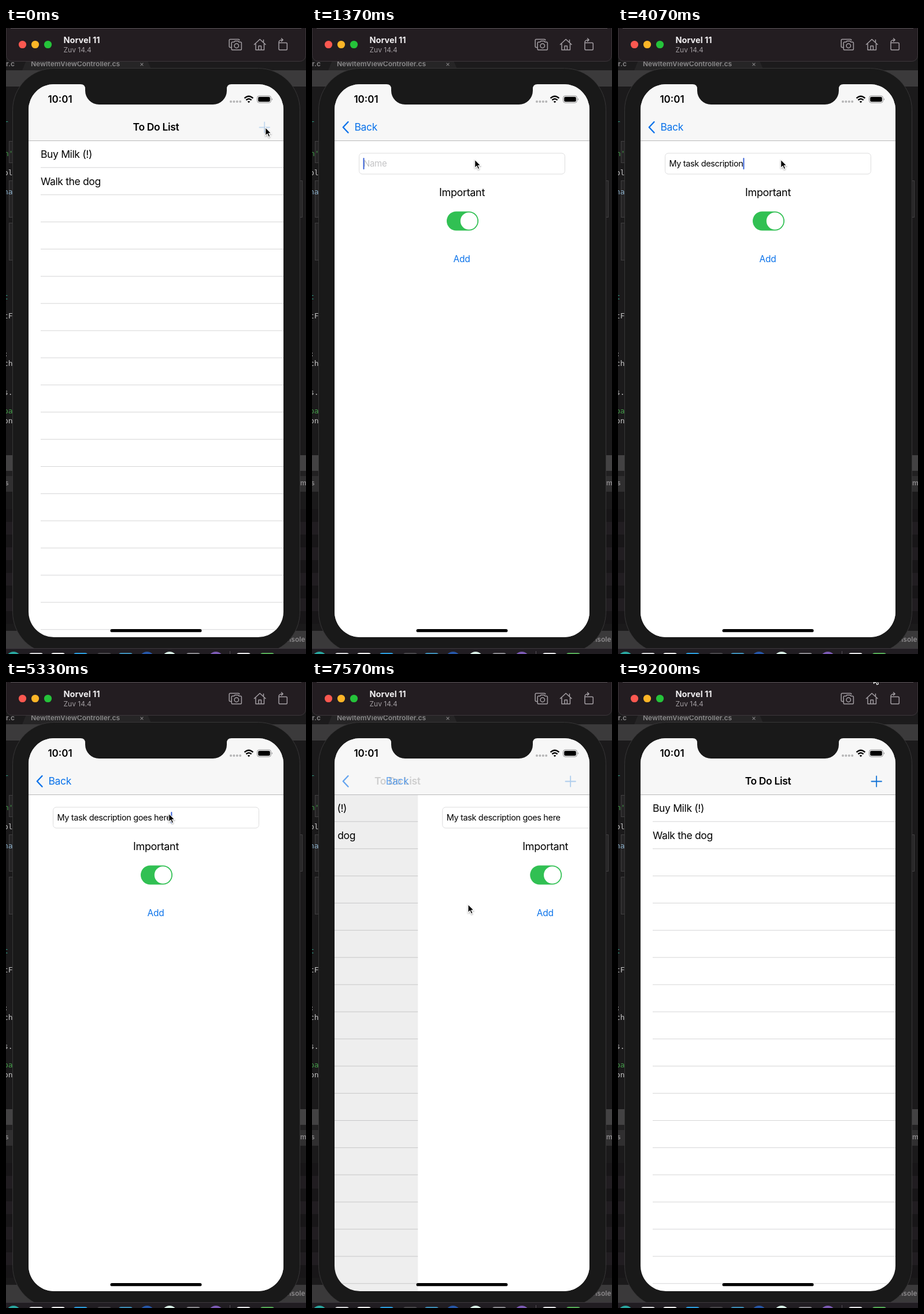
Recreate the animation shown at these times as an HTML page. Size 519 by 1080 pixels, loop 9230 ms.

```html
<!DOCTYPE html>
<html lang="en">
<head>
<meta charset="utf-8">
<title>To do list</title>
<style>
html, body { margin: 0; width: 100%; height: 100%; overflow: hidden; background: #1b1a1b; }
svg { display: block; width: 100vw; height: 100vh; font-family: Inter, "Liberation Sans", sans-serif; }
text { white-space: pre; }
.body { font-size: 17.5px; letter-spacing: -.02em; }
.field { font-size: 14.5px; letter-spacing: -.025em; }
.blue { fill: #0a72ea; }
.mid { text-anchor: middle; }
.bold { font-weight: 600; }
.code { font: 13px "DejaVu Sans Mono", "Liberation Mono", monospace; fill: #c4c4c4; }
.panel { font-size: 12px; font-weight: 600; fill: #8b898b; }
.icon { fill: none; stroke: #a29da2; stroke-width: 1.5; stroke-linejoin: round; stroke-linecap: round; }
</style>
</head>
<body>
<svg viewBox="0 0 519 1080">
  <defs>
    <clipPath id="screen"><rect x="39" y="97" width="441" height="954" rx="44"/></clipPath>
    <filter id="soft" x="-50%" y="-50%" width="200%" height="200%">
      <feDropShadow dx="0" dy="1.2" stdDeviation="1.2" flood-opacity=".4"/>
    </filter>
  </defs>

  <!-- editor behind the phone -->
  <rect width="519" height="1080" fill="#1b1a1b"/>
  <rect y="50" width="519" height="23" fill="#1c1b1c"/>
  <path d="M28 73L36 54H244L252 73Z" fill="#262526"/>
  <rect y="73" width="519" height="28" fill="#3b3a3b"/>
  <g class="panel" fill="#777">
    <text x="-7" y="66">er.c</text>
    <text x="43" y="66">NewItemViewController.cs</text>
    <text x="231" y="66" font-weight="400">×</text>
  </g>
  <g fill="#252425" stroke="#414041">
    <rect x="5.5" y="195.5" width="60" height="37"/>
    <rect x="5.5" y="263.5" width="507" height="63"/>
    <rect x="5.5" y="336.5" width="60" height="64"/>
  </g>
  <g id="code" class="code"></g>
  <rect y="737" width="519" height="27" fill="#434243"/>
  <rect y="764" width="519" height="9" fill="#222122"/>
  <rect y="773" width="519" height="27" fill="#302f30"/>
  <g id="rows"></g>
  <rect y="1040" width="519" height="30" fill="#3a393a"/>
  <g class="panel">
    <text x="-2" y="789">s</text>
    <text x="509" y="789">me</text>
    <text x="486" y="1059">nsole</text>
  </g>

  <!-- phone body -->
  <rect x="11.5" y="69.5" width="497" height="1010" rx="72" fill="#191919" stroke="#373637"/>

  <g clip-path="url(#screen)">
    <rect x="39" y="97" width="441" height="954" fill="#fff"/>
    <g id="list">
      <path id="lines" stroke="#d5d5d6"/>
      <text class="body" x="60" y="224">Buy Milk (!)</text>
      <text class="body" x="60" y="271">Walk the dog</text>
    </g>
    <rect id="dim" x="39" y="195" width="441" height="856"/>
    <g id="form">
      <rect x="39" y="195" width="441" height="856" fill="#fff"/>
      <rect x="81.5" y="216" width="356" height="36" rx="5.5" fill="#fff" stroke="#dcdcdd"/>
      <text id="hint" x="89" y="239" font-size="15" letter-spacing="-.3" fill="#c3c3c5">Name</text>
      <text id="entry" class="field" x="88.5" y="239"></text>
      <rect id="caret" y="224" width="2" height="20" rx="1" fill="#3a62d8"/>
      <text class="body mid" x="259.5" y="290" style="font-size:18px">Important</text>
      <rect x="233" y="316.5" width="55" height="33" rx="16.5" fill="#31c053"/>
      <circle cx="271.5" cy="333" r="14.7" fill="#fff"/>
      <text id="add" class="blue mid" x="259" y="403.5" font-size="15.5" letter-spacing="-.2">Add</text>
    </g>

    <rect x="39" y="97" width="441" height="98" fill="#f7f7f7"/>
    <path d="M39 194.5H480" stroke="#b9b9ba"/>
    <text id="title" class="body bold mid" x="259.5" y="177">To Do List</text>
    <path id="chevron" d="M62.5 162L53.8 171.2L62.5 180.5" fill="none" stroke="#0a72ea" stroke-width="2.4" stroke-linecap="round" stroke-linejoin="round"/>
    <text id="back" class="body blue" x="73.5" y="177">Back</text>
    <path id="plus" d="M438.5 171.5H456M447.2 162.5V180.5" stroke="#0f71d6" stroke-width="1.8" stroke-linecap="round"/>

    <text class="bold mid" x="93.5" y="129" font-size="17">10:01</text>
    <g fill="#b5b5b6">
      <circle cx="389" cy="127" r="2"/><circle cx="394.4" cy="127" r="2"/>
      <circle cx="399.8" cy="127" r="2"/><circle cx="405.2" cy="127" r="2"/>
    </g>
    <g fill="none" stroke="#000" stroke-width="2.5">
      <path d="M412.6 121.2Q420 114.2 427.4 121.2M415.4 124.4Q420 120 424.6 124.4"/>
      <path d="M420 129.2L417.7 126.9Q420 124.9 422.3 126.9Z" fill="#000" stroke="none"/>
    </g>
    <rect x="434.5" y="117" width="24" height="12" rx="3.6" fill="none" stroke="#8e8e8f"/>
    <rect x="436.2" y="118.7" width="20.6" height="8.6" rx="2.2"/>
    <path d="M460 121Q462.2 123 460 125Z" fill="#8e8e8f"/>
    <rect x="180.5" y="1037" width="158" height="5.3" rx="2.65"/>
    <path d="M129 96V97q8 0 8 8v3a24 24 0 0 0 24 24h197a24 24 0 0 0 24-24v-3q0-8 8-8V96Z" fill="#191919"/>
  </g>

  <!-- window bar -->
  <rect x=".5" y="-12" width="518" height="69.5" rx="10" fill="#231d21" stroke="#3c363a"/>
  <path d="M8 .5H511" stroke="#5a5458"/>
  <circle cx="28.5" cy="28.5" r="6.6" fill="#fb5850"/>
  <circle cx="50.5" cy="28.5" r="6.6" fill="#fcb527"/>
  <circle cx="72.5" cy="28.5" r="6.6" fill="#25c33a"/>
  <text x="99.5" y="26" font-size="14.5" font-weight="700" fill="#f1eff1">Norvel 11</text>
  <text x="99.5" y="42" font-size="12" fill="#a19ca0">Zuv 14.4</text>
  <g class="icon">
    <path d="M389.5 33.5H388Q386.2 33.5 386.2 31.5V21.2Q386.2 19.4 388 19.4H402Q403.8 19.4 403.8 21"/>
    <path d="M392 24.2H394.5L396 22.4H401.6L403.1 24.2H405.6Q407.4 24.2 407.4 26V36Q407.4 37.8 405.6 37.8H392Q390.2 37.8 390.2 36V26Q390.2 24.2 392 24.2Z"/>
    <circle cx="398.8" cy="30.7" r="3.7"/>
    <path d="M429.5 28.5L439.2 19.5L449 28.5M432 27V37.8H446.5V27M445.5 24.5V20.5M437 37.5V31H441.5V37.5"/>
    <path d="M472 25.5H484.5Q486.3 25.5 486.3 27.3V36Q486.3 37.8 484.5 37.8H474Q472 37.8 472 36ZM472 25.5Q471.5 20.5 479 20.5M476.5 18L479.2 20.5L476.5 23"/>
  </g>

  <!-- dock -->
  <rect y="1070" width="519" height="10" fill="#211d22"/>
  <path d="M0 1070.5H519" stroke="#3d383e"/>
  <path d="M387.5 1075V1080" stroke="#555057"/>
  <g id="dock"></g>

  <g id="cursor" filter="url(#soft)">
    <path d="M0 0V14.3L3.3 11.3L5.5 16.5L8 15.4L5.8 10.4H10.2Z" stroke="#fff" stroke-width="1.1"/>
  </g>
</svg>
<script>
const LOOP = 9230;
const PUSH = 0, POP = 7500;
const FOCUS = 1300, TYPED = 5200;
const MESSAGE = "My task description goes here";
const $ = id => document.getElementById(id);

function add(parent, tag, attrs, text = "") {
  const node = document.createElementNS("http://www.w3.org/2000/svg", tag);
  for (const key in attrs) node.setAttribute(key, attrs[key]);
  node.textContent = text;
  $(parent).append(node);
}

// Static details: separators, code margin, console rows, dock
let lines = "";
for (let i = 0; i < 18; i++) lines += `M60 ${(240.8 + i * 46.88).toFixed(1)}H480`;
$("lines").setAttribute("d", lines);

const TEAL = "#2fae94", GREEN = "#45a04a", PALE = "#c4c4c4";
[["r", -4, 168, TEAL], ["n'", -3, 221, GREEN], ["ol", -4, 254, PALE], ["na", -4, 287, "#8fb4cf"],
 ["t", -4, 468, TEAL], ["tF", -4, 501, PALE], [";", -4, 566, PALE], ["ch", -4, 583, PALE],
 ["s.", -4, 633, PALE], ["pa", -4, 665, GREEN], ["on", -4, 682, PALE]
].forEach(([s, x, y, fill]) => add("code", "text", { x, y, style: `fill:${fill}` }, s));

for (let i = 0; i < 9; i++)
  add("rows", "rect", { x: 0, y: 830 + i * 22, width: 519, height: 22, fill: i % 2 ? "#211d21" : "#181618" });

[[13, "#2aa7a0", 1], [52, "#d8d8da"], [90, "#f2f2f2"], [129, "#2d9fe0"], [170, "#4a484c"], [207, "#3f8fb8"],
 [244, "#2757a8", 1], [283, "#d9efe6", 1], [324, "#8c8b90"], [363, "#7d5bb5", 1], [411, "#e8e8ea"], [452, "#57ad58"]
].forEach(([x, fill, round]) => round
  ? add("dock", "circle", { cx: x, cy: 1089, r: 13, fill })
  : add("dock", "rect", { x: x - 12, y: 1078, width: 24, height: 24, rx: 4, fill }));

const clamp = v => Math.min(1, Math.max(0, v));

// Critically damped spring, 0 to 1
function spring(ms) {
  if (ms <= 0) return 0;
  const k = ms * 0.0165;
  return 1 - (1 + k) * Math.exp(-k);
}

const ease = {
  in: u => u * u,
  out: u => 1 - (1 - u) ** 2,
  both: u => u * u * (3 - 2 * u)
};

// time, x, y, easing towards this point
const path = [
  [60, 448.8, 171.5], [370, 430, 206.5, "in"], [1050, 281.7, 227, "out"],
  [5500, 281.7, 227, "both"], [6500, 268.3, 375.5, "both"], [6900, 270, 383.5, "both"],
  [8250, 270, 383.5, "both"], [9200, 442.5, -12, "both"]
];

function cursorAt(t) {
  const i = path.findIndex(p => t < p[0]);
  if (i === 0) return path[0].slice(1);
  if (i < 0) return path[path.length - 1].slice(1);
  const a = path[i - 1], b = path[i];
  const u = ease[b[3]]((t - a[0]) / (b[0] - a[0]));
  return [a[1] + (b[1] - a[1]) * u, a[2] + (b[2] - a[2]) * u];
}

// start, end, characters typed in that burst
const bursts = [[2450, 2780, 3], [2830, 4050, 16], [4250, TYPED, 10]];
const typed = t => bursts.reduce((n, [a, b, count]) => n + Math.floor(clamp((t - a) / (b - a)) * count), 0);

function caretShown(t) {
  if (t < FOCUS || t >= POP) return false;
  if (t >= bursts[0][0] && t < TYPED) return true;
  return (t - (t < TYPED ? FOCUS : TYPED)) % 1000 < 600;
}

const move = (id, x, y = 0) => $(id).setAttribute("transform", `translate(${x.toFixed(2)} ${y.toFixed(2)})`);
const fade = (id, v) => $(id).setAttribute("opacity", clamp(v).toFixed(3));

function render(t) {
  const p = t < POP ? spring(t - PUSH) : 1 - spring(t - POP);
  move("list", -132 * p);
  move("form", 441 * (1 - p));
  fade("dim", 0.1 * p);

  move("title", -166 * p);
  fade("title", 1 - p * 1.25);
  move("back", 166 * (1 - p));
  fade("back", p * 1.25 - 0.23);
  fade("chevron", p * 1.25 - 0.23);
  fade("plus", (t < POP ? 0.22 : 1.05) * (1 - p * 1.05));

  const entry = $("entry"), text = MESSAGE.slice(0, typed(t));
  if (entry.textContent !== text) entry.textContent = text;
  fade("hint", text ? 0 : 1);
  $("caret").setAttribute("x", 88.5 + (text ? entry.getComputedTextLength() : 0));
  fade("caret", caretShown(t) ? 1 : 0);
  fade("add", t > POP - 100 && t < POP ? 0.3 : 1);

  move("cursor", ...cursorAt(t));
}

const start = performance.now();
function frame() {
  render((performance.now() - start) % LOOP);
  requestAnimationFrame(frame);
}
frame();
</script>
</body>
</html>
```
